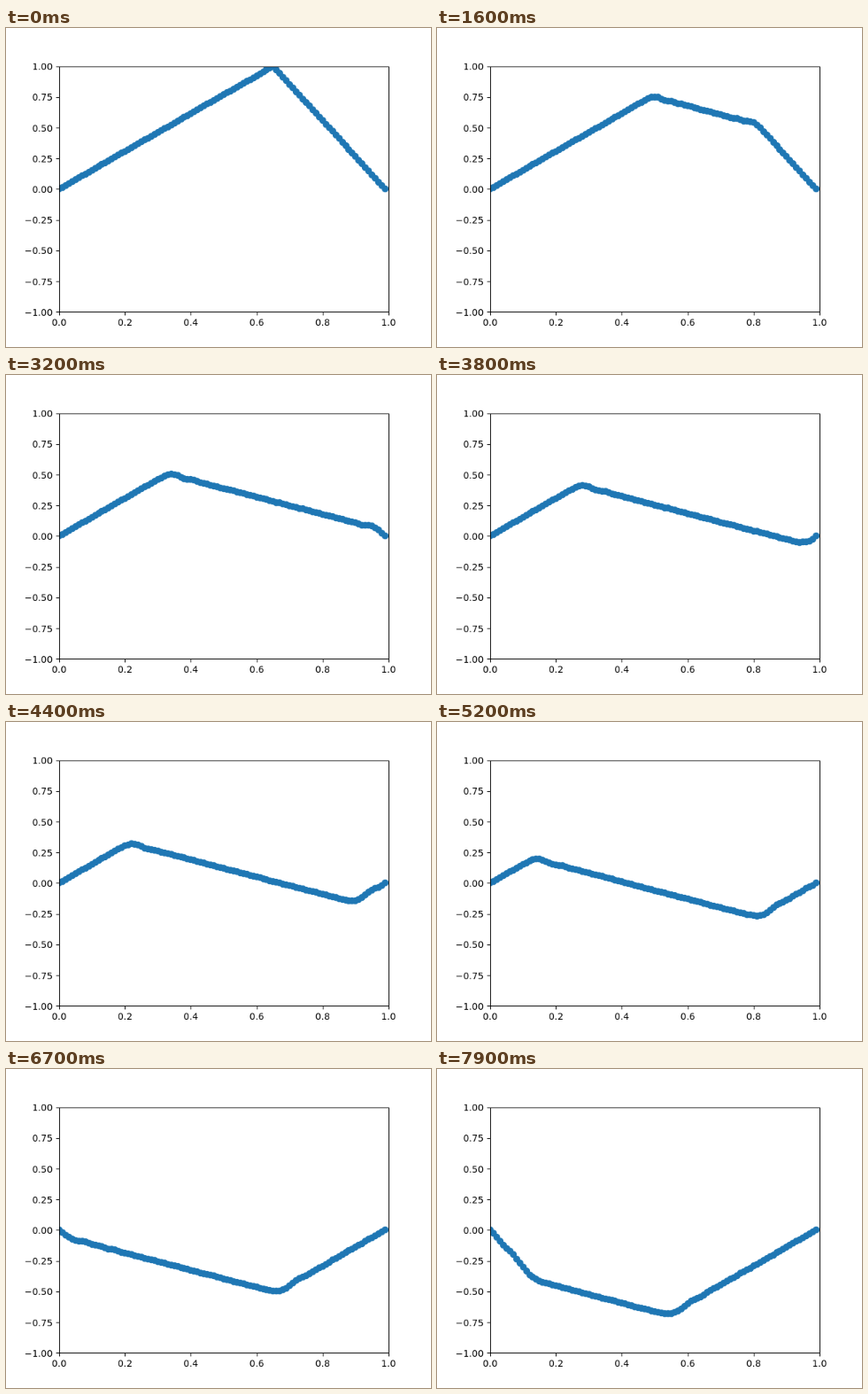
An HTML page with a canvas for the animation above (8 s loop, 480 by 360 pixels).

```html
<!DOCTYPE html>
<html lang="en">
<head>
<meta charset="utf-8">
<title>Plucked string</title>
<style>
  html, body { margin: 0; width: 100%; height: 100%; overflow: hidden; background: #fff; }
  canvas { display: block; width: 480px; height: 360px; }
</style>
</head>
<body>
<!-- The chart is laid out at 640 x 480 and shown at three quarters size. -->
<canvas id="stage" width="640" height="480"></canvas>
<script>
const ctx = document.getElementById('stage').getContext('2d', { alpha: false });
const POINTS = 100, FRAMES = 80, FRAME_MS = 100, SUBSTEPS = 10;
const PT = 100 / 72; // pixels per typographic point
const LEFT = 80, RIGHT = 576, TOP = 57.6, BOTTOM = 427.2;
const TICK = 3.5 * PT, RADIUS = 3.75 * PT;

const px = x => LEFT + x * (RIGHT - LEFT);
const py = y => (TOP + BOTTOM) / 2 - y * (BOTTOM - TOP) / 2;
const snap = v => Math.round(v) + 0.5;

// Wave equation on a string with fixed ends, plucked at 0.65.
// One cell is crossed per frame.
function simulate() {
  const last = POINTS - 1, peak = 65, dt = 1 / SUBSTEPS;
  const u = Array.from({ length: POINTS }, (_, i) =>
    i <= peak ? i / peak : (last - i) / (last - peak));
  const v = new Array(POINTS).fill(0);
  const kick = h => {
    for (let i = 1; i < last; i++) v[i] += h * (u[i - 1] - 2 * u[i] + u[i + 1]);
  };
  const states = [];
  kick(dt / 2);
  for (let f = 0; f < FRAMES; f++) {
    states.push(u.slice());
    for (let s = 0; s < SUBSTEPS; s++) {
      for (let i = 1; i < last; i++) u[i] += dt * v[i];
      kick(dt);
    }
  }
  return states;
}

function line(x1, y1, x2, y2) {
  ctx.beginPath();
  ctx.moveTo(x1, y1);
  ctx.lineTo(x2, y2);
  ctx.stroke();
}

function drawAxes() {
  ctx.strokeStyle = ctx.fillStyle = '#000';
  ctx.lineWidth = 0.8 * PT;
  ctx.font = `${10 * PT}px "DejaVu Sans", sans-serif`;
  ctx.strokeRect(snap(LEFT), snap(TOP), RIGHT - LEFT, snap(BOTTOM) - snap(TOP));

  ctx.textAlign = 'center';
  for (let i = 0; i <= 5; i++) {
    const x = px(i / 5);
    line(snap(x), snap(BOTTOM), snap(x), snap(BOTTOM + TICK));
    ctx.fillText((i / 5).toFixed(1), x, 448);
  }

  ctx.textAlign = 'right';
  for (let i = -4; i <= 4; i++) {
    const y = py(i / 4);
    line(snap(LEFT - TICK), snap(y), snap(LEFT), snap(y));
    ctx.fillText((i / 4).toFixed(2).replace('-', '\u2212'), LEFT - 2 * TICK, Math.round(y + 5.5));
  }
}

function drawString(u) {
  ctx.save();
  ctx.beginPath();
  ctx.rect(LEFT, Math.round(TOP), RIGHT - LEFT, Math.round(BOTTOM) - Math.round(TOP));
  ctx.clip();
  ctx.fillStyle = '#1f77b4';
  u.forEach((y, i) => {
    ctx.beginPath();
    ctx.arc(Math.round(px(i / POINTS)), Math.round(py(y)), RADIUS, 0, 2 * Math.PI);
    ctx.fill();
  });
  ctx.restore();
}

const states = simulate();
const start = performance.now();

function render() {
  const t = Math.max(0, performance.now() - start);
  ctx.fillStyle = '#fff';
  ctx.fillRect(0, 0, 640, 480);
  drawString(states[Math.floor(t / FRAME_MS) % FRAMES]);
  drawAxes();
  requestAnimationFrame(render);
}
render();
</script>
</body>
</html>
```
